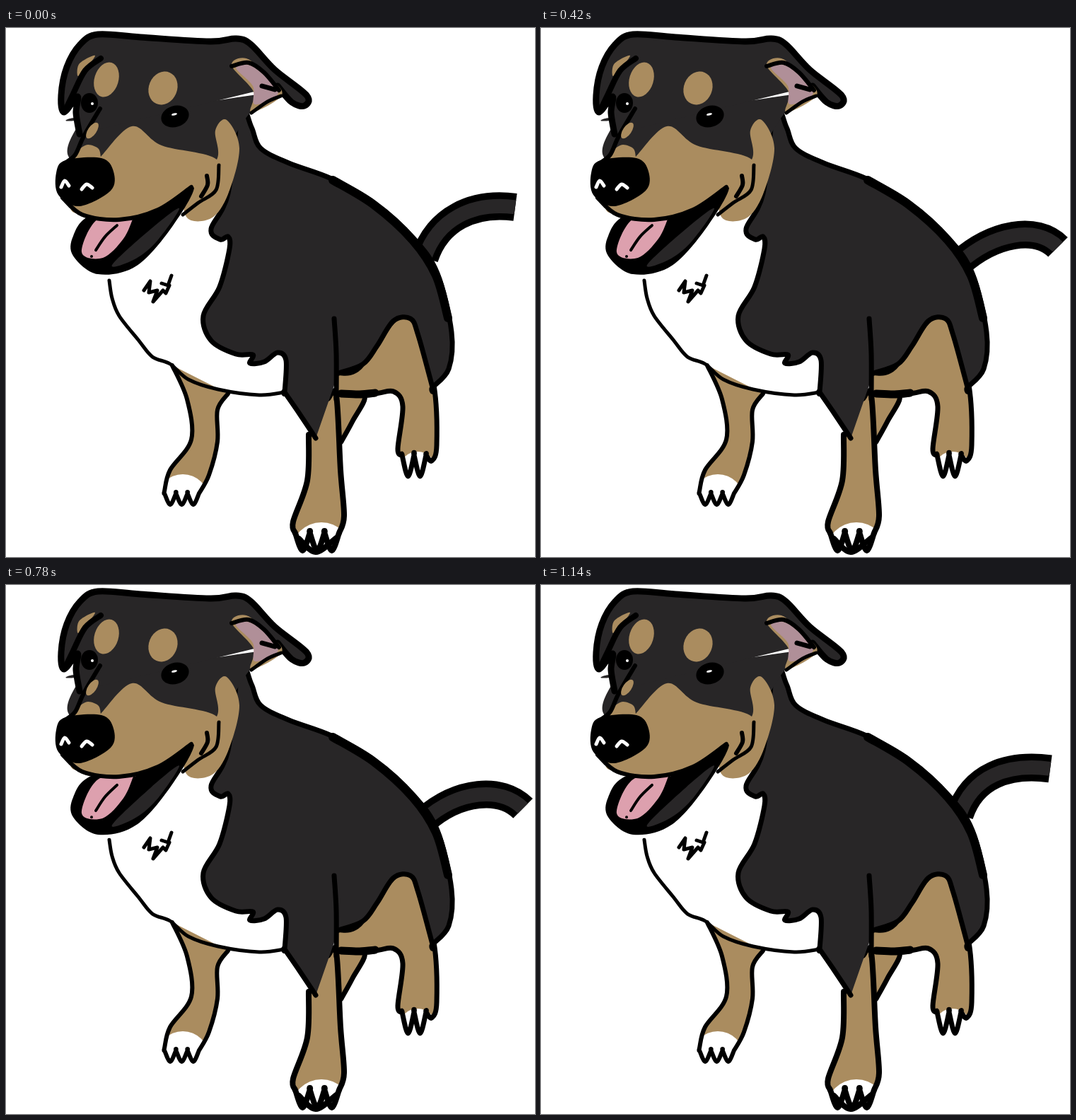
An HTML page with a canvas that plays this animation: 748x748 px, repeating every 1170 ms.

```html
<!DOCTYPE html>
<html>
<head>
<meta charset="utf-8">
<title>Happy dog</title>
<style>
html, body { margin: 0; width: 100%; height: 100%; overflow: hidden; background: #fff; }
canvas { display: block; width: 748px; height: 748px; }
</style>
</head>
<body>
<canvas id="stage" width="748" height="748"></canvas>
<script>
const ctx = document.getElementById('stage').getContext('2d');
const BLACK = '#000', COAT = '#282627', TAN = '#aa8c5f', PINK = '#dda0ae', EAR = '#b08f98', WHITE = '#fff';
const LOOP = 1170, STEP = 30, WAG = 300, PANT = 100;
ctx.lineJoin = 'round';

// Smooth curve through "x,y" key points; a repeated point makes a corner.
function curve(text, closed) {
  const p = text.trim().split(/\s+/).map(s => s.split(',').map(Number));
  const n = p.length, path = new Path2D();
  const at = i => closed ? p[(i + n) % n] : p[Math.max(0, Math.min(n - 1, i))];
  path.moveTo(...p[0]);
  for (let i = 0; i < (closed ? n : n - 1); i++) {
    const [a, b, c, d] = [at(i - 1), at(i), at(i + 1), at(i + 2)];
    path.bezierCurveTo(b[0] + (c[0] - a[0]) / 6, b[1] + (c[1] - a[1]) / 6,
      c[0] - (d[0] - b[0]) / 6, c[1] - (d[1] - b[1]) / 6, ...c);
  }
  return path;
}

function fill(color, path) {
  ctx.fillStyle = color;
  ctx.fill(path);
}

function stroke(width, path, color = BLACK, cap = 'round') {
  ctx.lineWidth = width;
  ctx.strokeStyle = color;
  ctx.lineCap = cap;
  ctx.stroke(path);
}

const patch = (color, text) => fill(color, curve(text, true));
const line = (width, text, color) => stroke(width, curve(text), color);

function outlined(color, width, text) {
  const path = curve(text);
  fill(color, path);
  stroke(width, path);
}

function oval(color, x, y, rx, ry, angle = 0) {
  const path = new Path2D();
  path.ellipse(x, y, rx, ry, angle, 0, 2 * Math.PI);
  fill(color, path);
}

// Soft pulse from 0 to 1 that is strongest at the given phase.
const pulse = (t, period, peak) => ((1 + Math.cos((t - peak) / period * 2 * Math.PI)) / 2) ** 2;

function toes(count, x0, x1, y, length) {
  const width = (x1 - x0) / count;
  let points = '';
  for (let x = x0, i = 0; i < count; i++, x += width) {
    const base = `${x},${y} `;
    points += base + base + `${x + width / 2},${y + length} `;
  }
  return points + `${x1},${y} ${x1},${y}`;
}

function leg(text, width, pawX, pawY, pawSize) {
  const path = curve(text);
  fill(TAN, path);
  ctx.save();
  ctx.clip(path);
  oval(WHITE, pawX, pawY, pawSize, pawSize);
  ctx.restore();
  stroke(width, path);
}

function tail(t) {
  const low = Math.cos(t / WAG * 2 * Math.PI) < 0;
  const drop = 9 * pulse(t, WAG, 215);
  const path = new Path2D(low
    ? `M592,332C640,290 700,${278 + drop} 731,${309 + drop}`
    : `M592,325C610,270 660,${244 + drop} 720,${252 + drop}`);
  stroke(39, path, BLACK, 'butt');
  stroke(20, path, COAT, 'butt');
}

function legs() {
  outlined(TAN, 7, '470,517 507,520 490,556 474,585');
  leg(`235,477 256,525 262,582 232,625 224,655 ${toes(3, 224, 273, 658, 16)} 287,632 299,585 299,540 314,517`, 6, 250, 668, 37);
  leg(`470,516 520,517 548,514 561,535 554,595 ${toes(2, 560, 594, 604, 30)} 602,612 609,590 605,505 580,412 548,414 500,480 470,488`, 7, 582, 626, 27);
  line(11, '474,517 500,518 522,516');
  leg(`428,575 426,640 406,698 ${toes(3, 409, 471, 714, 25)} 478,690 473,625 467,520 455,524`, 8, 446, 742, 43);
  line(8, '414,722 438,741 467,721');
}

function body() {
  outlined(COAT, 7, `438,580 412,541 394,515 394,515 396,470 384,459 365,472 345,474 349,462 325,461 290,442 279,407 302,366
    316,312 314,295 303,299 290,284 314,234 330,110 347,140 360,170 400,191 460,213 522,248 577,298 610,347 630,430 626,482
    603,508 603,508 583,435 572,411 548,414 525,449 505,475 470,488`);
  line(12, '462,215 520,250 575,300 608,350 625,410');
  line(7, '464,411 467,460 467,525');
}

function chest(drop) {
  line(5, `146,${357 + drop * .65} 150,${382 + drop * .3} 160,407 187,441 207,465 232,475 258,497 300,511 358,519 394,515`);
  stroke(5, new Path2D('M195,371L204,358L202,374L214,371L208,387L222,371L226,375L231,364M220,361L229,364L234,350'));
}

function jaw(drop) {
  const k = drop / 132;
  ctx.save();
  ctx.transform(1, -k, 0, 1, 0, 262 * k);
  patch(BLACK, '120,265 95,294 95,322 130,348 185,336 237,278 265,222 200,250');
  patch(COAT, '150,335 205,284 245,255 212,303 180,328');
  patch(PINK, '130,270 107,317 137,325 166,298 180,268 180,268');
  line(4, '157,279 140,295 127,314');
  oval(BLACK, 121, 323, 2, 2);
  ctx.restore();
}

function ears() {
  patch(TAN, '101,67 104,50 126,39 108,63');
  line(8, '83,118 95,93 112,60 134,43');
  patch(TAN, '319,53 340,43 372,70 390,95 347,119 350,90');
  patch(EAR, '325,56 350,55 385,91 352,108 349,82');
  line(6, '319,54 343,49 365,63 386,88');
  line(7, '362,82 380,87');
  line(5, '389,96 370,104 347,120');
}

function head() {
  patch(COAT, '105,130 105,130 100,190 298,190 325,150 347,118 384,90 384,90');
  outlined(COAT, 9, '104,150 99,120 101,97 82,119 78,95 86,55 105,23 130,9 190,13 288,19 325,15 346,23 380,59 425,95 422,110 404,105 384,82');
}

function muzzle() {
  patch(TAN, '90,250 97,186 112,166 130,170 134,182 134,182 178,139 220,166 298,186 297,232 264,225 264,225 215,257 160,271 108,264');
  line(6, '80,240 108,264 160,271 215,257 262,225');
  line(6, '133,114 110,153 98,179 85,190');
  patch(BLACK, '71,205 84,187 135,184 152,203 148,230 104,252 74,236');
  line(5, '78,225 83,216 89,223', WHITE);
  line(5, '107,228 114,221 122,226', WHITE);
  line(5, '301,194 297,229 272,247 250,264');
  line(6, '284,209 285,222 276,238');
}

function markings() {
  oval(TAN, 142, 73, 17, 25, .3);
  oval(TAN, 222, 85, 20, 24, .4);
  oval(TAN, 122, 145, 6, 13, .6);
  oval(BLACK, 118, 106, 12, 14);
  oval(WHITE, 122, 107, 2, 2);
  oval(BLACK, 239, 125, 20, 15, -.3);
  oval(WHITE, 238, 122, 4, 1.5, -.25);
}

function draw(t) {
  const drop = 11.5 * pulse(t, PANT, 60);
  ctx.fillStyle = WHITE;
  ctx.fillRect(0, 0, 748, 748);
  tail(t);
  legs();
  body();
  chest(drop);
  head();
  ears();
  patch(TAN, '255,215 298,186 296,145 312,130 330,170 314,235 290,269 255,267');
  jaw(drop);
  muzzle();
  markings();
}

const start = performance.now();
function tick() {
  const time = (performance.now() - start) % LOOP;
  draw(Math.floor(time / STEP) * STEP);
  requestAnimationFrame(tick);
}
tick();
</script>
</body>
</html>
```
